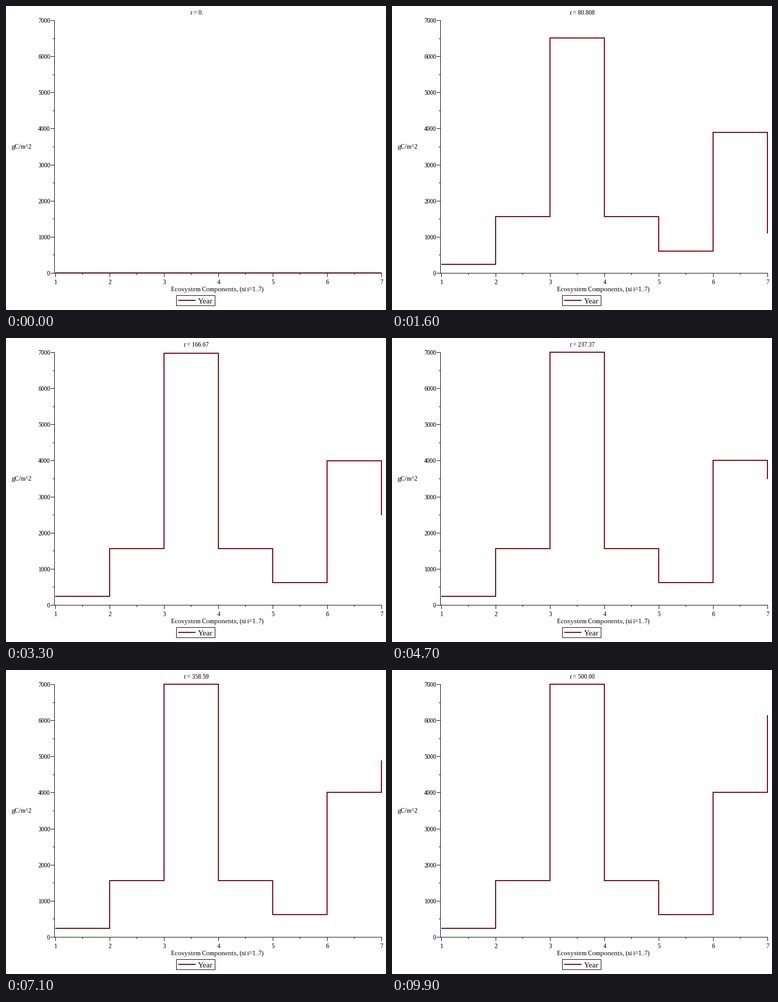
Animation, 748 px wide and 599 px high, one loop 10000 ms. Source, as a matplotlib script:

```python
import numpy as np
import matplotlib.pyplot as plt
from matplotlib.animation import FuncAnimation
from matplotlib.collections import LineCollection
from matplotlib.patches import Rectangle

W, H, DPI = 748, 599, 64
FRAMES, YEARS = 100, 500
PT = 72 / DPI                      # points per pixel
X0, DX = 97, 107                   # x of component 1, spacing
Y0, YSCALE = 526, 498 / 7000       # y of zero, pixels per unit
WINE = "#78000e"

plt.rcParams.update({
    "font.family": "Liberation Serif",
    "text.hinting": "native",
    "text.hinting_factor": 1,
    "path.snap": False,
})


def flow(x):
    """Carbon flow: leaves, branches, stems, roots, litter, humus, charcoal."""
    npp = 777.8
    leaf, branch, stem, root = x[:4] / (1, 10, 30.3, 10)
    litter, humus, coal = x[4], x[5] / 9.92, x[6] / 500
    return np.array([
        0.3 * npp - leaf,
        0.2 * npp - branch,
        0.297 * npp - stem,
        0.2 * npp - root,
        leaf + branch + stem - litter,
        0.4 * litter + root - humus,
        0.0496 * humus - coal,
    ])


def simulate(substeps=20):
    h = YEARS / (FRAMES - 1) / substeps
    x = np.zeros(7)
    states = [x]
    for _ in range(FRAMES - 1):
        for _ in range(substeps):
            a = flow(x)
            b = flow(x + h / 2 * a)
            c = flow(x + h / 2 * b)
            d = flow(x + h * c)
            x = x + h / 6 * (a + 2 * b + 2 * c + d)
        states.append(x)
    return np.array(states)


fig = plt.figure(figsize=(W / DPI, H / DPI), dpi=DPI, facecolor="white")
ax = fig.add_axes([0, 0, 1, 1])
ax.set_xlim(0, W)
ax.set_ylim(H, 0)
ax.axis("off")


def label(x, y, s, ha="left", size=13, **kw):
    return ax.text(x, y, s, ha=ha, va="baseline", fontsize=size * PT,
                   color="black", **kw)


# Axes and ticks, as one-pixel lines
segs = [[(95.5, 28), (95.5, 527)], [(95, 526.5), (740, 526.5)]]
for k in range(15):
    y = round(Y0 - k * 500 * YSCALE) + 0.5
    segs.append([(92 if k % 2 else 88, y), (95, y)])
    if k % 2 == 0:
        label(87, y + 4.5, str(k * 500), ha="right")
for k in range(13):
    x = int(X0 + k * DX / 2) + 0.5
    segs.append([(x, 527), (x, 530 if k % 2 else 534)])
    if k % 2 == 0:
        label(x, 548, str(1 + k // 2), ha="center")
ax.add_collection(LineCollection(segs, colors="black", linewidths=PT,
                                 antialiaseds=False, capstyle="butt", zorder=3))

label(10, 281, "gC/m^2")
label(325, 562, "Ecosystem Components, (xi i=1..7)")

# Legend
ax.add_patch(Rectangle((335.5, 570.5), 76, 20, fill=False, ec="black",
                       lw=PT, antialiased=False))
wine = dict(color=WINE, lw=2 * PT, antialiased=False,
            solid_capstyle="butt", solid_joinstyle="miter")
ax.plot([339, 373], [580, 580], **wine)
label(378, 586, "Year", size=15)

steps, = ax.plot([], [], zorder=2, **wine)
t_name = label(349, 17, "t", style="italic")
t_value = label(356, 17, "")

levels = np.round(Y0 - simulate() * YSCALE)
xs = np.repeat(X0 + DX * np.arange(7), 2)[1:]


def year_text(t):
    if t == 0:
        return "0."
    whole = len(str(int(t)))
    return f"{t:.{5 - whole}f}"


def update(i):
    steps.set_data(xs, np.repeat(levels[i], 2)[:-1])
    left = 349 if i else 362
    t_name.set_x(left)
    t_value.set_x(left + 7)
    t_value.set_text("= " + year_text(YEARS * i / (FRAMES - 1)))
    return steps, t_name, t_value


anim = FuncAnimation(fig, update, frames=FRAMES, interval=100,
                     repeat=True, repeat_delay=0)
plt.show()
```
